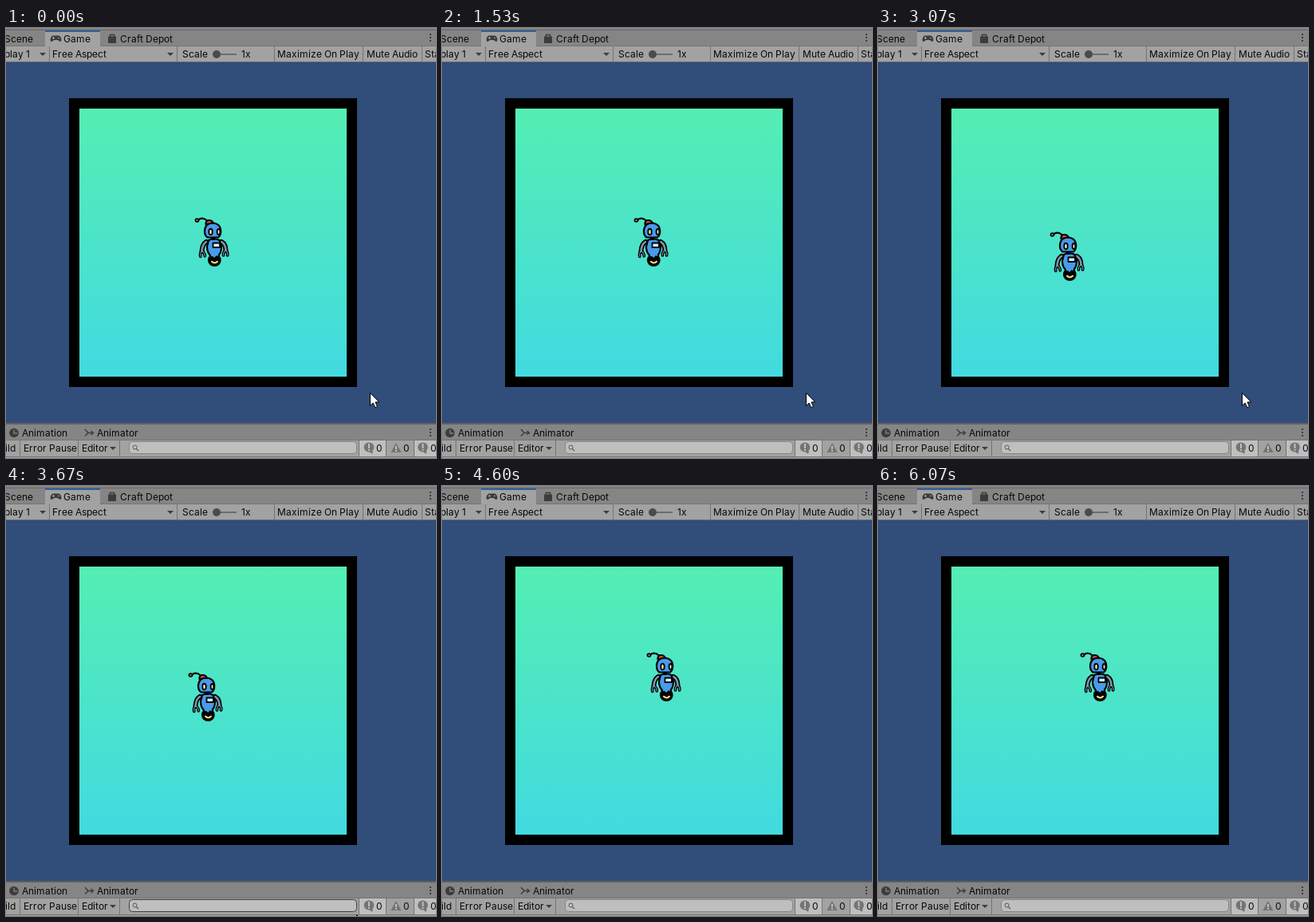
An HTML page with a canvas for the animation above (6.59 s loop, 539x539 px).

```html
<!DOCTYPE html>
<html lang="en">
<head>
<meta charset="utf-8">
<title>Game view</title>
<style>
html, body { margin: 0; width: 100%; height: 100%; overflow: hidden; background: #314d79; }
canvas { display: block; width: 539px; height: 539px; }
</style>
</head>
<body>
<canvas id="stage" width="539" height="539"></canvas>
<script>
const ctx = document.getElementById('stage').getContext('2d');
const LOOP = 6590, STEP = 1000 / 15;
const BAR = '#a2a2a2', TABS = '#858585', LINE = '#747474', INK = '#080808', ICON = '#3c3c3c';
const LIT = '#bfbfbf', BADGE = '#747474';

// Waypoints: [step, x, y]
const walk = [
  [7, 0, 0], [14, -22, 0], [15, -21, 0], [17, -15, 0], [23, 4, 0], [25, 10, 0],
  [27, 14.4, 4.7], [31, 14.4, 17], [36, 4, 27.4], [38, -1, 31], [40, -7, 31],
  [46, -21, 18], [47, -21, 16], [49, -21, 10], [55, -8, -4], [57, -5, -8],
  [67, 17, -29], [68, 17.4, -29], [69, 20, -29], [77, 44, -29], [79, 50, -29],
  [81, 45, -29], [87, 27, -29], [90, 17, -29]
];
// The pointer leaves through the lower edge
const pointer = [[51, 456, 457], [54, 442, 518], [55, 439, 537], [56, 437, 560]];

function along(path, k) {
  if (k <= path[0][0]) return path[0].slice(1);
  for (let i = 1; i < path.length; i++) {
    const [k0, x0, y0] = path[i - 1], [k1, x1, y1] = path[i];
    if (k <= k1) {
      const p = (k - k0) / (k1 - k0);
      return [Math.round(x0 + (x1 - x0) * p), Math.round(y0 + (y1 - y0) * p)];
    }
  }
  return path[path.length - 1].slice(1);
}

function rect(x, y, w, h, color) {
  ctx.fillStyle = color;
  ctx.fillRect(x, y, w, h);
}

// Glyph advances snap to whole pixels, as in the editor's interface
const advance = ch => Math.round(ctx.measureText(ch).width);

function text(str, x, y, align = 'left') {
  ctx.font = '12px Inter, "Liberation Sans", sans-serif';
  ctx.fillStyle = INK;
  if (align === 'right') x -= [...str].reduce((w, ch) => w + advance(ch), 0);
  for (const ch of str) {
    ctx.fillText(ch, x, y);
    x += advance(ch);
  }
}

function shape(d, fill, stroke, width = 2) {
  const p = new Path2D(d);
  if (fill) { ctx.fillStyle = fill; ctx.fill(p); }
  if (stroke) { ctx.strokeStyle = stroke; ctx.lineWidth = width; ctx.stroke(p); }
}

function oval(x, y, rx, ry, fill, stroke, width = 2) {
  ctx.beginPath();
  ctx.ellipse(x, y, rx, ry, 0, 0, Math.PI * 2);
  if (fill) { ctx.fillStyle = fill; ctx.fill(); }
  if (stroke) { ctx.strokeStyle = stroke; ctx.lineWidth = width; ctx.stroke(); }
}

const arrow = (x, y) => shape(`M${x} ${y}h8l-4 4z`, ICON);
const dividers = (xs, y, h) => xs.forEach(x => rect(x, y, 1, h, LINE));
const dots = y => [-4, 0, 4].forEach(d => rect(531, y + d - 1, 2, 2, ICON));

function topBars() {
  rect(0, 0, 539, 23, TABS);
  rect(0, 2, 539, 1, '#676767');
  rect(49, 3, 69, 20, BAR);
  rect(49, 3, 69, 2, '#315f9b');
  rect(0, 23, 539, 20, BAR);
  rect(0, 22, 49, 1, LINE);
  rect(118, 22, 421, 1, LINE);
  rect(0, 42, 539, 1, '#6b6b6b');
  text('Scene', 34, 18, 'right');
  text('Game', 72, 18);
  text('Craft Depot', 143, 18);

  // Gamepad
  shape('M59 9.5H66Q69 10 69.5 15Q69 18.5 66 16L64.5 15H60.5L59 16Q56 18.5 55.5 15Q56 10 59 9.5Z', ICON);
  rect(58, 12, 3, 1, BAR);
  rect(59, 11, 1, 3, BAR);
  rect(65, 12, 2, 1, BAR);
  // Bag
  shape('M128 10.5h10v8.5h-10z', ICON);
  shape('M130.5 11V8.5H135.5V11', null, ICON, 1.4);
  dots(12);

  text('Display 1', 30, 37, 'right');
  arrow(42, 31);
  text('Free Aspect', 58, 37);
  arrow(202, 31);
  text('Scale', 221, 37);
  rect(259, 32, 30, 2, '#6c6c6c');
  oval(264, 33, 5, 5, '#4b4b4b');
  text('1x', 295, 37);
  text('Maximize On Play', 340, 37);
  text('Mute Audio', 452, 37);
  text('Stats', 525, 37);
  dividers([54, 214, 336, 447, 521], 23, 19);
}

function bubble(x) {
  oval(x, 525.5, 6.3, 6, BADGE);
  shape(`M${x - 1} 530h6l-1 4z`, BADGE);
  rect(x - 1, 521, 2, 6, LIT);
  rect(x - 1, 528, 2, 2, LIT);
}

function bottomBars(hover) {
  rect(0, 495, 539, 2, '#606060');
  rect(0, 497, 539, 20, TABS);
  rect(0, 516, 539, 1, LINE);
  rect(0, 517, 539, 22, BAR);
  rect(0, 537, 539, 1, LINE);
  oval(10, 507.5, 5.8, 5.8, ICON);
  shape('M10 503.5V508H14', null, TABS, 1.3);
  text('Animation', 20, 512);
  shape('M99 503L103 507.5L99 511.5M103 507.5H109M106.5 505L109.5 507.5L106.5 510', null, ICON, 1.4);
  text('Animator', 114, 512);
  dots(507);

  text('Build', 12, 531, 'right');
  text('Error Pause', 22, 531);
  text('Editor', 95, 531);
  arrow(130, 525);
  dividers([17, 90, 142], 517, 20);

  ctx.beginPath();
  ctx.roundRect(154.5, 518.5, 285, 15, 4);
  ctx.fillStyle = LIT;
  ctx.fill();
  ctx.strokeStyle = hover ? '#3f3f3f' : '#858585';
  ctx.lineWidth = 1;
  ctx.stroke();
  oval(161.5, 525.5, 2.5, 2.5, null, '#555', 1);
  shape('M163.3 527.3L166 530', null, '#555', 1.2);

  rect(443, 517, 33, 20, LIT);
  rect(512, 517, 27, 20, LIT);
  dividers([442, 476, 511], 517, 20);
  bubble(455);
  shape('M489 520L495.5 532H482.5Z', BADGE);
  rect(488, 524, 2, 4, LIT);
  rect(488, 529, 2, 2, LIT);
  bubble(522.5);
  [464, 498, 532].forEach(x => text('0', x, 531));
}

function arena() {
  rect(0, 43, 539, 452, '#314d79');
  rect(79, 88, 361, 362, '#000');
  const sky = ctx.createLinearGradient(0, 101, 0, 437);
  sky.addColorStop(0, '#54eeb3');
  sky.addColorStop(1, '#42dae0');
  rect(92, 101, 335, 336, sky);
}

function robot(x, y) {
  const blue = '#489be9', grey = '#7f93ad', black = '#000';
  ctx.save();
  ctx.translate(x, y);
  ctx.lineCap = ctx.lineJoin = 'round';

  // Wheel
  oval(261.3, 291, 8.4, 8, black);
  shape('M258 292.8Q261.5 296.4 265 292.8', null, '#ffe27a', 2);

  // Arms and claws
  const claws = 'M245 280Q242.8 283 243.8 286.5M246 280Q249.5 282 249.3 286M275 279Q272 281 272.5 285M276 279Q278.6 282 277.6 285';
  const arms = 'M251 268Q246 271 245.5 280M270 268Q275.5 271 275.5 279';
  shape(claws, null, black, 3.6);
  shape(arms, null, black, 6);
  shape(arms, null, grey, 2.6);
  shape(claws, null, grey, 1.1);

  // Body
  shape('M254 266Q261 262.5 267.5 266L270 274Q270 281 267 284V288L264 286.5L261.5 289.5L258.5 287L256 288V285Q252 281 252 274Z', blue, black, 2.2);
  shape('M259.5 269.5H268V275H259.5Z', '#d9edff', black, 1.8);
  rect(257, 262, 5, 4, black);

  // Antenna and cap
  shape('M241 240.5Q246 236.5 252 241.5', null, black, 2.2);
  oval(239.5, 241, 2, 1.9, '#ee806b', black, 1.8);
  shape('M250.3 246Q250.5 241 254.5 241Q259 241 260 245Z', '#e34b3b', black, 2);

  // Head
  shape('M249 255Q249 245 259 244.5Q269.2 245 269.2 255Q269.2 260 266 262.5H252.5Q249 260 249 255Z', blue, black, 2.2);
  oval(256.5, 255.5, 2.2, 3.7, '#fff1bd', black, 1.9);
  oval(266.5, 255.5, 1.9, 3.5, '#fff1bd', black, 1.9);
  ctx.restore();
}

function cursor(x, y) {
  ctx.save();
  ctx.translate(x + .5, y + .5);
  ctx.lineJoin = 'miter';
  shape('M0 0V16L3.7 12.6L6.3 18.2L9 17L6.5 11.4H11.2Z', '#fff', '#000', 1);
  ctx.restore();
}

function draw(now) {
  const t = now % LOOP;
  const k = Math.floor((t + 3.4) / STEP);
  arena();
  robot(...along(walk, k));
  topBars();
  bottomBars(k === 54 || k === 55);
  cursor(...along(pointer, k));
}

const start = performance.now();
function tick() {
  draw(performance.now() - start);
  requestAnimationFrame(tick);
}
tick();
</script>
</body>
</html>
```
